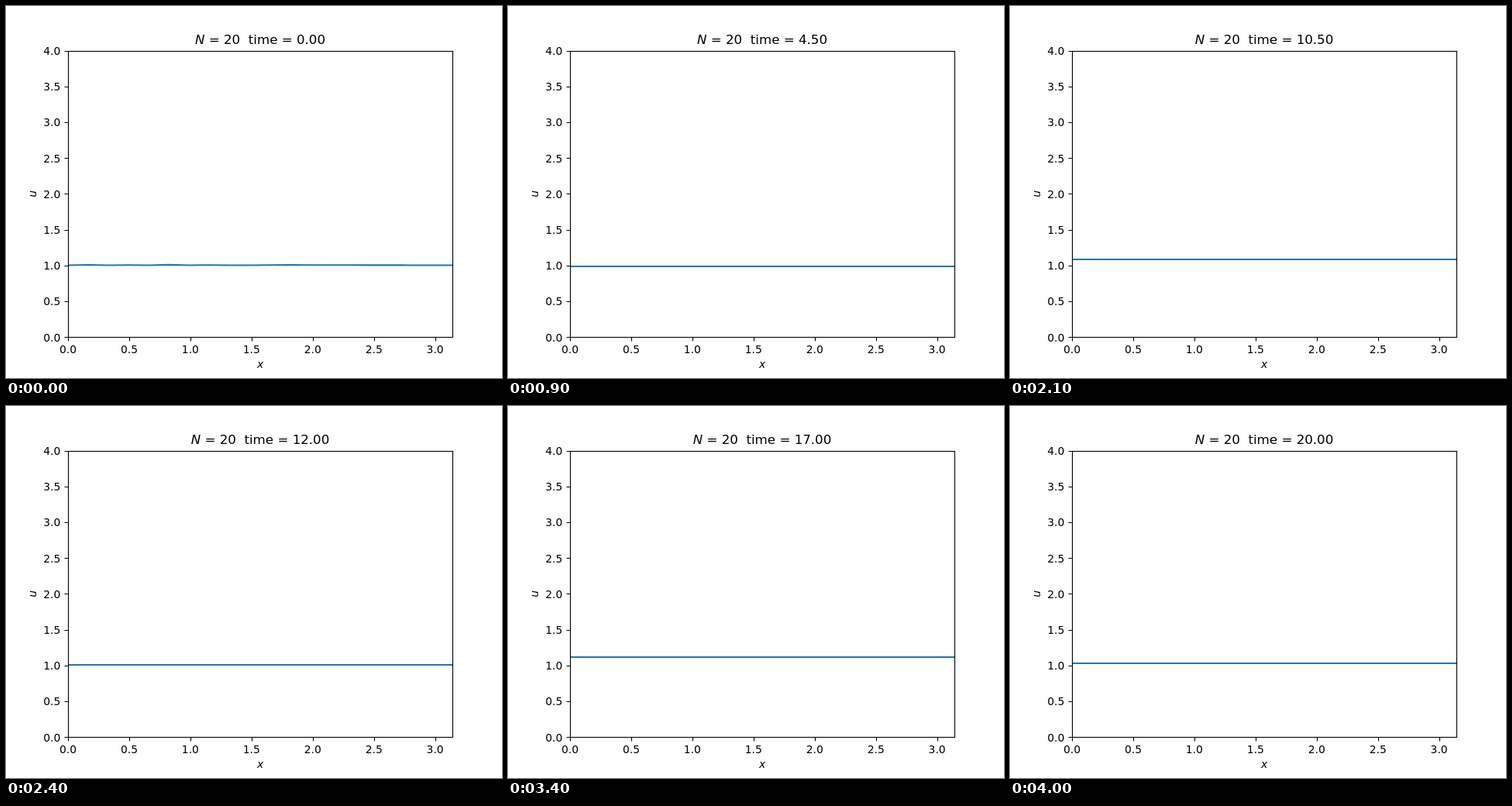
These frames come from a looping animation (640 px wide and 480 px high, 4100 ms). An HTML page:

```html
<!DOCTYPE html>
<html lang="en">
<head>
<meta charset="utf-8">
<title>u over x</title>
<style>
  html, body { margin: 0; width: 100%; height: 100%; overflow: hidden; background: #fff; }
  svg { display: block; width: 640px; height: 480px; }
  text { font-family: "DejaVu Sans", sans-serif; font-size: 13.89px; white-space: pre; }
  .it { font-style: italic; }
  .mid { text-anchor: middle; }
  .end { text-anchor: end; }
  #title { font-size: 16.67px; }
  .frame { fill: none; stroke: #000; stroke-width: 1.11; }
</style>
</head>
<body>
<svg viewBox="0 0 640 480">
  <rect width="640" height="480" fill="#fff"/>
  <clipPath id="plot"><rect x="80" y="57.6" width="496" height="369.6"/></clipPath>
  <path id="curve" clip-path="url(#plot)" fill="none" stroke="#1f77b4" stroke-width="2.083" stroke-linejoin="round"/>
  <rect class="frame" x="80.5" y="58.5" width="496" height="369"/>
  <path id="ticks" class="frame"/>
  <g id="labels"></g>
  <text id="title" class="mid" x="328" y="49.3"><tspan class="it">N</tspan><tspan id="clock"></tspan></text>
  <text class="mid it" x="328" y="467">x</text>
  <text class="mid it" transform="translate(39 242.4) rotate(-90)">u</text>
</svg>
<script>
const STEP = 100, STEPS = 41, DT = 0.5;
const LEFT = 80, WIDTH = 496, BOTTOM = 427.2, UNIT = 92.4;

// deviation of u from 1 at whole time units (last one only shapes the end slope)
const drift = [0.0057, 0.0102, 0.0104, 0.0035, -0.007, -0.023, -0.0325, -0.0235,
  0.0095, 0.05, 0.081, 0.075, 0.004, -0.095, -0.1645, -0.1645, -0.058,
  0.117, 0.335, 0.345, 0.03, -0.26];
// initial noise at the mesh nodes, in thousandths
const noise = [-2, 3, -3, 0, -3, 4, -3, 1, -3, -2, 0, 2, 1, 0, 1, -1, -1, -2, -3, -3];

const el = id => document.getElementById(id);
const px = x => LEFT + x * WIDTH / Math.PI;
const py = u => BOTTOM - u * UNIT;
const crisp = v => Math.round(v) + 0.5;

function level(t) {
  const i = Math.floor(t), f = t - i;
  const at = k => drift[Math.max(0, Math.min(drift.length - 1, k))];
  const a = at(i - 1), b = at(i), c = at(i + 1), d = at(i + 2);
  return 1 + b + f / 2 * (c - a + f * (2 * a - 5 * b + 4 * c - d + f * (3 * (b - c) + d - a)));
}

function curvePath(t) {
  const y = py(level(t));
  if (t >= 2) return `M80 ${Math.round(y)}H576`;
  const fade = Math.exp(-4 * t) / 1000;
  return "M" + noise.map((n, i) =>
    `${(LEFT + WIDTH * i / (noise.length - 1)).toFixed(2)} ${(y - n * fade * UNIT).toFixed(3)}`).join("L");
}

function buildAxes() {
  let ticks = "", labels = "";
  for (let i = 0; i <= 8; i++) {
    const v = i / 2, name = v.toFixed(1);
    ticks += `M80.5 ${crisp(py(v))}h-5`;
    labels += `<text class="end" x="70.3" y="${(py(v) + 5.3).toFixed(1)}">${name}</text>`;
    if (v > Math.PI) continue;
    ticks += `M${crisp(px(v))} 427.5v5`;
    labels += `<text class="mid" x="${px(v).toFixed(2)}" y="448">${name}</text>`;
  }
  el("ticks").setAttribute("d", ticks);
  el("labels").innerHTML = labels;
}

let shown = -1;
function draw(ms) {
  const step = Math.floor(ms / STEP) % STEPS;
  if (step === shown) return;
  shown = step;
  const t = step * DT;
  el("curve").setAttribute("d", curvePath(t));
  el("clock").textContent = ` = 20  time = ${t.toFixed(2)}`;
}

buildAxes();
draw(0);
const start = performance.now();
function tick() {
  draw(performance.now() - start);
  requestAnimationFrame(tick);
}
requestAnimationFrame(tick);
</script>
</body>
</html>
```
